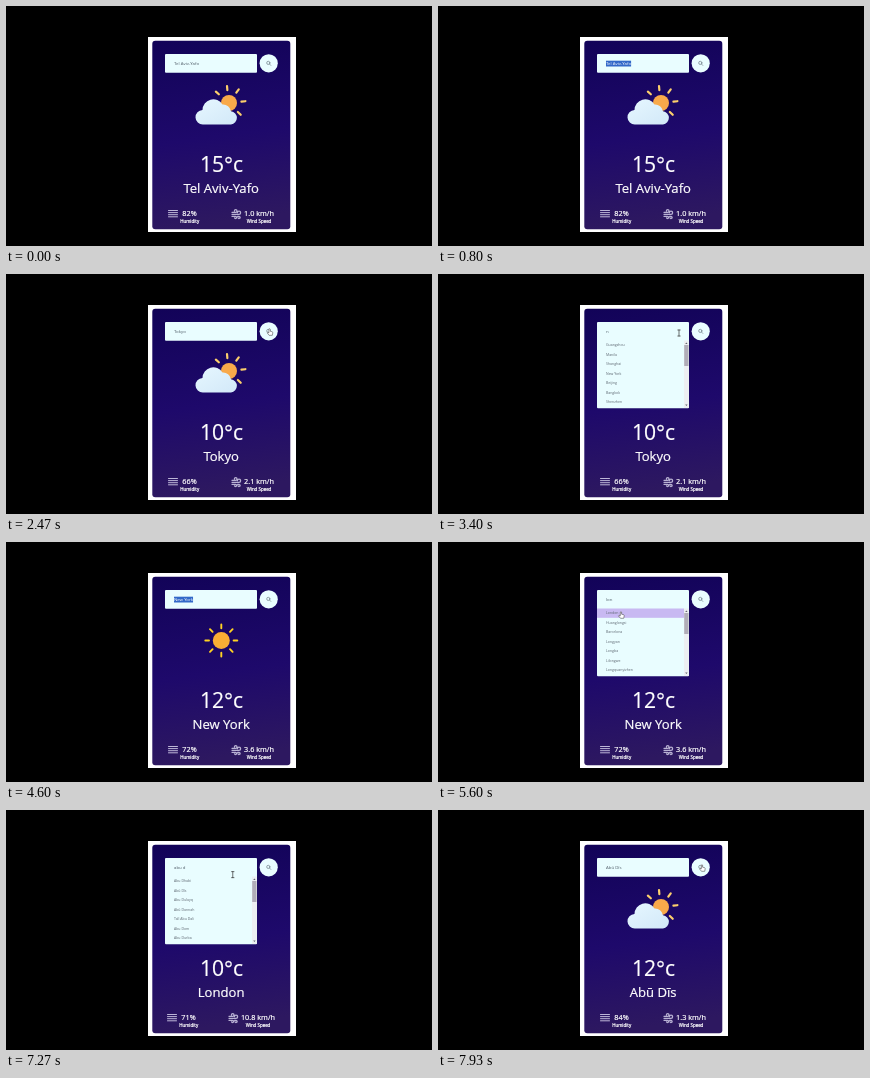
Recreate the animation shown at these times as an HTML page. Size 426 px wide and 240 px high, loop 8000 ms.

```html
<!DOCTYPE html>
<html lang="en">
<head>
<meta charset="utf-8">
<title>Weather search</title>
<style>
html, body { margin: 0; width: 100%; height: 100%; overflow: hidden; background: #000; }
svg { display: block; width: 100vw; height: 100vh; font-family: "Open Sans", "Noto Sans", sans-serif; }
.mid { text-anchor: middle; fill: #fff; stroke: #fff; stroke-width: .22; }
.line { fill: none; stroke-linecap: round; stroke-linejoin: round; }
</style>
</head>
<body>
<svg viewBox="0 0 426 240">
  <defs>
    <linearGradient id="night" x1="0" y1="0" x2="0.1" y2="1">
      <stop offset="0" stop-color="#120358"/>
      <stop offset="0.55" stop-color="#1e096b"/>
      <stop offset="1" stop-color="#2d1860"/>
    </linearGradient>
    <linearGradient id="mist" x1="0" y1="0" x2="1" y2="1">
      <stop offset="0" stop-color="#e6f7ff"/>
      <stop offset="1" stop-color="#d2e8f8"/>
    </linearGradient>
    <linearGradient id="haze">
      <stop offset="0.5" stop-color="#ece6fb"/>
      <stop offset="0.5" stop-color="#d0d0e6"/>
    </linearGradient>
    <linearGradient id="glow">
      <stop offset="0.5" stop-color="#ffd054"/>
      <stop offset="0.5" stop-color="#f5b53a"/>
    </linearGradient>
  </defs>
  <rect width="426" height="240"/>
  <rect x="142" y="31" width="148" height="195" fill="#fff"/>
  <rect x="146.300" y="34.800" width="138" height="188.400" rx="3" fill="url(#night)"/>

  <g id="cloudy">
    <g id="cloudyRays" class="line" stroke="#fccf6c" stroke-width="2.200"/>
    <circle cx="223" cy="97" r="8" fill="#f8a94a"/>
    <path fill="url(#mist)" d="M197 118.500a7.200 7.200 0 0 1-.5-14.500A10.800 10.800 0 0 1 216.500 98.500a8 8 0 0 1 8.500 6.700 6.700 6.700 0 0 1 0 13.300z"/>
  </g>
  <g id="sunny">
    <g id="sunnyRays" class="line" stroke="#ffd322" stroke-width="1.900"/>
    <circle cx="215.300" cy="98.500" r="8.500" fill="#faae34"/>
  </g>
  <g id="rainy">
    <g id="rainyRays" class="line" stroke="#fcc440" stroke-width="2"/>
    <circle cx="211.300" cy="91.500" r="9.500" fill="url(#glow)"/>
    <path fill="url(#haze)" d="M206 112.500a6.600 6.600 0 0 1-.7-13.100A10.500 10.500 0 0 1 214 93.500a9.500 9.500 0 0 1 13.500 4.700 7.200 7.200 0 0 1 .3 14.300z"/>
    <path class="line" stroke="#78bdf5" stroke-width="1.900" d="M212.300 113.500l-2 4.500M218.300 113.500l-2 4.500M224.300 113.500l-2 4.500"/>
  </g>

  <text id="temp" class="mid" x="215.500" y="166" font-size="21.100"/>
  <text id="city" class="mid" x="215.200" y="186.600" font-size="13.100"/>

  <g id="humidBox">
    <path class="line" stroke="#cfc9e6" stroke-width=".9" d="M162.500 204.500h9M162.500 206.600h9M162.500 208.700h9M162.500 210.800h9"/>
    <text id="humid" class="mid" x="183.500" y="210" font-size="7.300"/>
    <text class="mid" x="183.700" y="217" font-size="4.450">Humidity</text>
  </g>
  <g id="windIcon" class="line" stroke="#b9b2d4" stroke-width="1.300">
    <path d="M226 206.300h3.700a1.300 1.300 0 1 0-1.300-1.300M226 208.300h7a1.600 1.600 0 1 0-1.600-1.600M226 210.300h3.500a1.100 1.100 0 1 1-1 1.500M231.500 210.300h1.500a1.100 1.100 0 1 1-1 1.500"/>
  </g>
  <g id="windBox">
    <text id="wind" class="mid" x="253" y="210" font-size="7.300"/>
    <text class="mid" x="253" y="217" font-size="4.450">Wind Speed</text>
  </g>

  <rect x="159" y="48" width="92" height="18.700" rx="1" fill="#e9fdff"/>
  <rect id="mark" x="168" y="54.700" height="5.800" fill="#3268c8"/>
  <text id="query" x="168" y="59.200" font-size="4.350"/>
  <circle cx="262.700" cy="57.300" r="9.100" fill="#e9fdff"/>
  <g class="line" stroke="#6c7c86" stroke-width=".7">
    <circle cx="262.300" cy="56.900" r="1.600"/>
    <path d="M263.500 58.100l1.300 1.300"/>
  </g>

  <g id="menu">
    <rect x="159" y="65" width="92" height="69.200" rx="1" fill="#e9fdff"/>
    <rect id="hover" x="159" width="87" height="9.300" fill="#c8b9f2"/>
    <g id="rows" fill="#5c6670" font-size="3.500"/>
    <rect x="246" y="66.500" width="4.800" height="67.500" fill="#eceff2"/>
    <rect x="246.200" y="71" width="4.300" height="21" fill="#b0adb8"/>
    <path fill="#62656c" d="M247.200 70l1.200-1.400 1.200 1.400zM247.200 130.600l1.200 1.400 1.200-1.400z"/>
  </g>

  <g id="cursor">
    <path id="beam" class="line" stroke="#333" stroke-width=".7" d="M-1.200-3h2.400M0-3v6M-1.200 3h2.400"/>
    <path id="hand" fill="#fff" stroke="#333" stroke-width=".5" d="M-.7-3q.7-.8 1.300 0v2.200l2 .5q.7.300.6 1.200l-.5 2.400h-3.200l-2-2.500q.2-1 1.800 0z"/>
    <path id="arrow" fill="#fff" stroke="#333" stroke-width=".4" d="M0-2v5.500l1.300-1.100.9 2 .8-.4-.9-1.900h1.700z"/>
  </g>
</svg>
<script>
const LOOP = 8000;
const $ = id => document.getElementById(id);

const weather = [
  { at: 0, city: "Tel Aviv-Yafo", temp: 15, humid: 82, wind: "1.0", icon: "cloudy" },
  { at: 2300, city: "Tokyo", temp: 10, humid: 66, wind: "2.1", icon: "cloudy" },
  { at: 4250, city: "New York", temp: 12, humid: 72, wind: "3.6", icon: "sunny" },
  { at: 6150, city: "London", temp: 10, humid: 71, wind: "10.8", icon: "rainy" },
  { at: 7870, city: "Abū Dīs", temp: 12, humid: 84, wind: "1.3", icon: "cloudy" }
];

// Each search: select the old text, type, pick a row.
const searches = [
  { select: 500, type: 850, step: 230, text: "tok", pick: 1900, row: 0,
    list: "Tokyo,Vladivostok,Stoke-on-Trent,Tokorozawa,Białystok,Tokushima,Tokoname" },
  { select: 2750, type: 3200, step: 200, text: "n", pick: 3850, row: 3,
    list: "Guangzhou,Manila,Shanghai,New York,Beijing,Bangkok,Shenzhen" },
  { select: 4500, type: 4900, step: 190, text: "lon", pick: 5720, row: 0,
    list: "London,Huanglongsi,Barcelona,Longyan,Longba,Lilongwe,Longquanyizhen" },
  { select: 6470, type: 6800, step: 110, text: "abu d", pick: 7520, row: 1,
    list: "Abu Dhabi,Abū Dīs,Abu Dulayq,Abū Dannah,Tall Abu Dali,Abu Dom,Abu Durba" }
];

// time, x, y
const moves = [
  [0, 263, 58], [180, 263, 58], [480, 241, 59], [1560, 241, 59], [1800, 183, 72], [1950, 183, 72],
  [2240, 264, 58], [2450, 264, 58], [2720, 241, 59], [3480, 241, 59], [3760, 183, 100],
  [3900, 183, 100], [4180, 264, 58], [4300, 264, 58], [4470, 241, 59], [5250, 241, 59],
  [5500, 183, 73], [5760, 183, 73], [6080, 264, 58], [6230, 264, 58], [6450, 241, 59],
  [7200, 241, 59], [7420, 183, 82], [7560, 183, 82], [7820, 264, 58], [8000, 264, 58]
];

function rays(id, cx, cy, inner, outer, angles) {
  const d = angles.map(deg => {
    const a = deg * Math.PI / 180, c = Math.cos(a), s = Math.sin(a);
    return `M${cx + c * inner} ${cy + s * inner}L${cx + c * outer} ${cy + s * outer}`;
  }).join("");
  $(id).innerHTML = `<path d="${d}"/>`;
}
rays("cloudyRays", 222.5, 97, 13, 17, [-138, -95, -53, -6, 44]);
rays("sunnyRays", 215.3, 98.5, 12.3, 16, [0, 45, 90, 135, 180, 225, 270, 315]);
rays("rainyRays", 211.3, 91.5, 12.2, 14, [-210, -180, -150, -120, -90, -60, -30]);

for (let i = 0; i < 7; i++) {
  const row = document.createElementNS("http://www.w3.org/2000/svg", "text");
  row.setAttribute("x", 168);
  row.setAttribute("y", 72.3 + 9.5 * i);
  $("rows").append(row);
}

function setText(el, value) {
  if (el.textContent !== value) el.textContent = value;
}
const show = (id, on) => $(id).setAttribute("visibility", on ? "inherit" : "hidden");
const shift = (id, x) => $(id).setAttribute("transform", `translate(${x} 0)`);

function pointer(t) {
  const i = Math.max(1, moves.findIndex(m => m[0] > t));
  const [t0, x0, y0] = moves[i - 1], [t1, x1, y1] = moves[i];
  const u = (t - t0) / (t1 - t0), e = u * u * (3 - 2 * u);
  return [x0 + (x1 - x0) * e, y0 + (y1 - y0) * e];
}

function drawWeather(t) {
  const w = weather.filter(v => v.at <= t).pop();
  setText($("temp"), `${w.temp}°c`);
  setText($("city"), w.city);
  setText($("humid"), `${w.humid}%`);
  setText($("wind"), `${w.wind} km/h`);
  for (const id of ["cloudy", "sunny", "rainy"]) show(id, id === w.icon);
  const wide = w.wind.length > 3;
  shift("humidBox", wide ? -1 : 0);
  shift("windBox", wide ? -1 : 0);
  shift("windIcon", wide ? -3 : 0);
}

function searchState(t) {
  const state = { text: weather[0].city, marked: false, open: null };
  for (const s of searches) {
    const names = s.list.split(",");
    if (t >= s.select) state.marked = t < s.type;
    if (t >= s.pick) state.text = names[s.row];
    else if (t >= s.type) {
      state.text = s.text.slice(0, 1 + Math.floor((t - s.type) / s.step));
      state.open = names;
    }
  }
  return state;
}

function drawSearch({ text, marked, open }, over, y) {
  const query = $("query");
  setText(query, text);
  query.setAttribute("fill", marked ? "#fff" : "#505d68");
  show("mark", marked);
  if (marked) $("mark").setAttribute("width", query.getComputedTextLength());

  show("menu", open);
  if (open) [...$("rows").children].forEach((row, i) => setText(row, open[i]));
  show("hover", over);
  if (over) $("hover").setAttribute("y", 66.5 + 9.5 * Math.floor((y - 66.5) / 9.5));
}

function drawCursor(t, x, y, over, marked) {
  const hand = over || Math.hypot(x - 262.7, y - 57.3) < 9;
  const beam = !hand && x < 251 && y < 67;
  show("hand", hand);
  show("beam", beam);
  show("arrow", !hand && !beam);
  // The pointer is out of sight over marked text and during the first typing.
  const typing = t > searches[0].type && t < 1560;
  show("cursor", t >= 180 && !marked && !typing);
  $("cursor").setAttribute("transform", `translate(${x} ${y})`);
}

function draw(t) {
  const [x, y] = pointer(t);
  const state = searchState(t);
  const over = state.open && y > 66.5 && x < 246;
  drawWeather(t);
  drawSearch(state, over, y);
  drawCursor(t, x, y, over, state.marked);
}

const start = performance.now();
function tick() {
  draw((performance.now() - start) % LOOP);
  requestAnimationFrame(tick);
}
tick();
</script>
</body>
</html>
```
